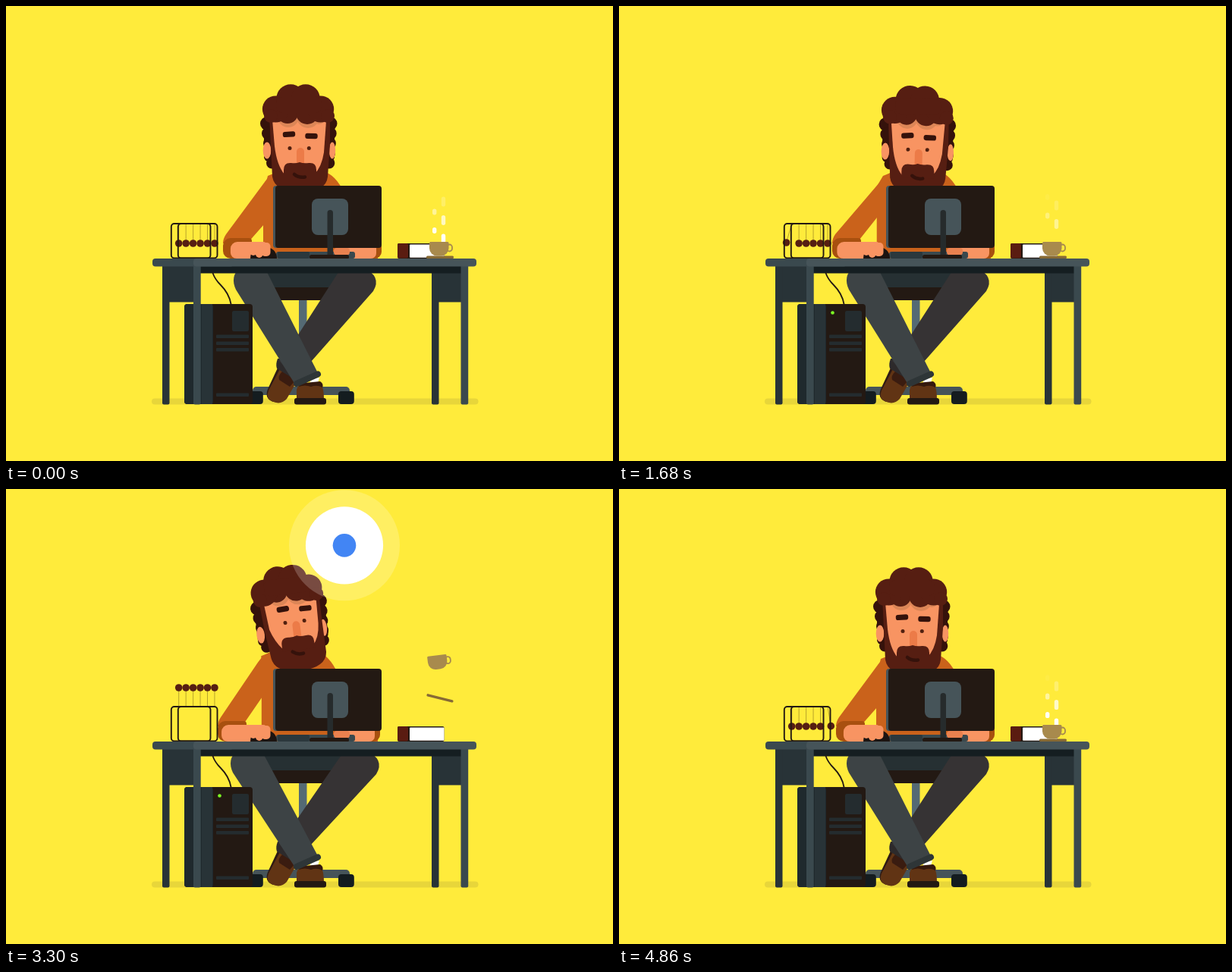
Animation, 800 px wide and 600 px high, one loop 4.89 s. Source, as an HTML page with a canvas:

```html
<!DOCTYPE html>
<html lang="en">
<head>
<meta charset="utf-8">
<title>Desk worker</title>
<style>
html, body { margin: 0; width: 100%; height: 100%; overflow: hidden; background: #ffeb3b; }
canvas { display: block; width: 800px; height: 600px; }
</style>
</head>
<body>
<canvas id="stage" width="800" height="600"></canvas>
<script>
const ctx = document.getElementById('stage').getContext('2d');
const LOOP = 4890, SWING = LOOP / 6, STEP = 30;
const C = {
  bg: '#ffeb3b', ink: '#231913', slate: '#465459', steel: '#3a494e', deep: '#283337',
  skin: '#f89462', blush: '#ec7b48', shade: '#dc8657', hair: '#561e12', hairDark: '#35120b',
  shirt: '#ca621b', cuff: '#a8500f', shoe: '#613414', cup: '#a88a4d', saucer: '#876a35'
};

const REST = { x: 0, y: 0, tilt: 0, faceX: 0, faceY: 0, torsoX: 0, torsoY: 0, elbow: 286, knee: 0 };
const UP = { ...REST, x: 8, y: -13, tilt: -4, faceX: 5.5, faceY: -6, torsoX: 9, torsoY: -7, knee: -5 };
const LEAN = { ...REST, x: 6, y: 2, tilt: 1.2, torsoX: 3, elbow: 281 };
const DROP = { ...REST, y: 6, tilt: -3, faceX: 4.5, faceY: -2, torsoX: -3, elbow: 280, knee: 4 };
const GAZE = { ...DROP, x: -4, y: -4, tilt: -7, faceY: -9.5, torsoX: -9, torsoY: -4, elbow: 279 };
const CUES = [
  [0, REST], [480, REST], [860, UP], [1050, UP], [1650, LEAN], [2300, DROP],
  [2800, GAZE], [3250, GAZE], [3650, DROP], [4250, DROP], [4720, REST], [LOOP, REST]
];

const clamp = v => Math.max(0, Math.min(1, v));
const ease = v => v * v * (3 - 2 * v);
const ramp = (t, a, b) => clamp((t - a) / (b - a));
const bell = (t, a, b) => Math.sin(Math.PI * ramp(t, a, b));

function poseAt(t) {
  const next = CUES.findIndex(([time]) => time > t);
  const [[a, from], [b, to]] = [CUES[next - 1], CUES[next]];
  const u = ease(ramp(t, a, b)), pose = {};
  for (const key in from) pose[key] = from[key] + (to[key] - from[key]) * u;
  return pose;
}

function box(x1, y1, x2, y2, color, r = 0) {
  ctx.fillStyle = color;
  ctx.beginPath();
  ctx.roundRect(x1, y1, x2 - x1, y2 - y1, r);
  ctx.fill();
}
function frame(x, y, w, h, r, color, width) {
  ctx.strokeStyle = color;
  ctx.lineWidth = width;
  ctx.beginPath();
  ctx.roundRect(x, y, w, h, r);
  ctx.stroke();
}
function disc(x, y, r, color, ry = r) {
  ctx.fillStyle = color;
  ctx.beginPath();
  ctx.ellipse(x, y, r, ry, 0, 0, Math.PI * 2);
  ctx.fill();
}
function shape(d, color) {
  ctx.fillStyle = color;
  ctx.fill(new Path2D(d));
}
function line(d, color, width) {
  ctx.strokeStyle = color;
  ctx.lineWidth = width;
  ctx.lineCap = 'round';
  ctx.stroke(new Path2D(d));
}
function placed(x, y, degrees, draw) {
  ctx.save();
  ctx.translate(x, y);
  ctx.rotate(degrees * Math.PI / 180);
  draw();
  ctx.restore();
}
function clipped(x, y, w, h, draw) {
  ctx.save();
  ctx.beginPath();
  ctx.rect(x, y, w, h);
  ctx.clip();
  draw();
  ctx.restore();
}

function drawChair() {
  box(386, 380, 396.5, 505, '#546a74');
  box(325, 502, 453, 513, C.slate, 5);
  for (const x of [318, 438]) box(x, 508, x + 20.8, 525, '#141c1f', 4);
  box(350, 350, 432, 388, C.ink, 6);
  box(338, 345, 450, 371, '#263033');
}

function drawLegs(k) {
  // far shoe and leg
  shape('M360 473L346 503Q339 517 352 522L375 500L380 488Z', '#2f1b14');
  shape('M362 477L346 507Q342 517 350 521Q362 527 370 518L381 499Q372 480 362 477Z', C.shoe);
  shape('M364 482Q358 488 360 493L374 502L381 494L376 482Z', '#3a1c10');
  shape('M358 465L395 466L378 491L357 478Q355 473 358 465Z', '#2d2a2b');
  shape(`M${442 + k} 345H${470 + k}Q${496 + k} 356 ${484 + k} 376L402 469L380 488L360 468L386 432Z`, '#363334');
  // near shoe and leg
  shape('M402 492L413 490L410 500H400Z', '#fff');
  shape('M383 519V506Q385 497 394 497H412Q419 499 419 519Z', C.shoe);
  shape('M386 502Q388 496 394 497L414 495Q419 498 417 503Q410 499 402 502Q394 499 386 502Z', '#35190d');
  box(380, 517, 422, 525.5, C.ink, 3);
  shape(`M${341 - k} 345L410 482L381 499L${303 - k} 374Q${295 - k} 357 ${308 - k} 345Z`, '#3d4345');
  line('M383 498L411 485.5', '#2e3537', 8);
}

function drawTower(lit) {
  box(235, 393, 325, 525, C.ink, 4);
  box(235, 393, 273, 525, '#1f292d', 4);
  box(258, 393, 272, 525, C.deep);
  box(298, 402, 320, 429, '#242c2f', 2);
  for (const y of [433.5, 442.5, 451, 510.5]) box(277, y, 320, y + 4.5, '#242c2f', 1);
  if (lit) disc(281.5, 404.5, 2.3, '#7dfb24');
}

function drawDesk() {
  for (const x of [206, 561]) {
    box(x, 338, x + 41, 390.5, C.deep);
    box(x, 340, x + 9.5, 525.5, C.deep, 2);
  }
  box(256, 340, 602, 352.5, '#151e21');
  for (const x of [247, 599.5]) box(x, 340, x + 9.7, 525.5, C.steel, 2);
  box(193, 333, 300, 343.5, C.steel, 4);
  box(247, 333, 620, 343.5, C.slate, 4);
  line('M272.5 352Q275 360 283 368Q294 379 296.5 393', C.ink, 1.8);
}

function drawTorso({ torsoX, torsoY, elbow, knee }) {
  const edge = 339 + torsoX * .25, inner = 288 + (elbow - 286) * 2;
  const sx = 345 + torsoX, sy = 224 + torsoY;
  const hand = 284 + (elbow - 279) * 1.7, cuff = 495 - knee * .5;
  shape(`M${sx} ${sy}L${sx + 15} ${sy - 6}H${sx + 70}Q${sx + 86} ${sy - 5} ${sx + 98} ${sy + 17}L490 310V333H${edge}V${inner - 40}Z`, C.shirt);
  shape(`M${sx + 15} ${sy - 6}Q${sx + 3} ${sy - 3} ${sx - 4} ${sy + 8}L${elbow + 4} 301Q${elbow} 307 ${elbow} 313H${elbow + 32}L${edge + 1} ${inner}L${sx + 25} ${sy + 20}Z`, C.shirt);
  shape(`M${sx + 31} ${sy + 6}L${sx + 41} ${sy + 20}H${sx + 59}L${sx + 67} ${sy + 4}Z`, '#fff');
  box(elbow, 306, elbow + 22, 333, C.cuff, [10, 0, 0, 10]);
  box(elbow + 15, 306, elbow + 38, 316, C.cuff, 4);
  box(hand, 311, 344, 333, C.skin, [9, 5, 5, 8]);
  box(cuff - 18, 314, cuff, 333, C.cuff, [0, 4, 9, 0]);
  box(440, 317, cuff - 7, 333, C.skin, [0, 0, 7, 0]);
}

function drawFace(fx, fy) {
  shape(`M${350 + fx * .5} 138L${354 + fx * .6} 185Q${357 + fx} ${210 + fy} ${367 + fx} ${222 + fy}H${406 + fx}Q${416 + fx} ${213 + fy} ${419 + fx * .6} ${193 + fy}L423 138Z`, C.skin);
  placed(fx, fy, 0, () => {
    for (const x of [374, 399.3]) disc(x, 187.5, 2.5, '#51200f');
    box(383, 187, 393, 212, C.blush, 5);
    shape('M366 225V216Q366 206 376 207Q382 208 387 206Q392 208 399 207Q409 206 409 216V225Z', C.hair);
  });
  placed(fx * .8, fy * .5, 0, () => line('M380 222Q386 227 394 225.5', C.hairDark, 4.5));
}

function drawHair(fx, fy) {
  const fringe = (color, dx, dy) => {
    for (const [x, r] of [[371, 14], [397, 15], [411, 10]]) disc(x + dx, 140 + dy, r, color);
  };
  clipped(352, 125, 70, 50, () => fringe(C.shade, 1 + fx * .4, 6 + fy * .5));
  fringe(C.hair, fx * .2, 1 + fy * .5);
  for (let i = 0; i < 4; i++) {
    const arch = Math.sin(Math.PI * i / 3);
    disc(355.5 + i * 19.7, 136 - arch * 16, 17.6 + arch * 1.5, C.hair);
  }
  for (const x of [349, 424]) disc(x, 145, 9, C.hair);
  box(356, 120, 416, 141, C.hair, 8);
}

function drawHead({ x, y, tilt, faceX: fx, faceY: fy }) {
  placed(390 + x, 235 + y, tilt, () => {
    ctx.translate(-390, -235);
    box(340, 145, 433, 205, C.hairDark, 6);
    for (let i = 0; i < 5; i++) {
      const cy = 155 + i * 13, r = 9 - i * .4;
      disc(344 + i * 1.6, cy, r, C.hairDark);
      disc(427.5 - i * .4, cy, r, C.hairDark);
    }
    disc(344 + fx * .1, 190.5, 5.3, C.skin, 11);
    disc(430 - fx * .4, 190.5, 4.2, C.skin, 11);
    const bx = fx * .8, by = fy * .25;
    shape(`M347 142L${349 + bx * .3} 185L${351 + bx} ${225 + by}Q${354 + bx} ${245 + by} ${388 + bx} ${246 + by}Q${422 + bx} ${245 + by} ${424 + bx} ${225 + by}L427 183V142Z`, C.hair);
    drawFace(fx, fy);
    drawHair(fx, fy);
    for (const [bx, by, turn] of [[373, 169.2, -3], [402.5, 171.5, 1]])
      placed(bx + fx, by + fy, turn, () => box(-8.2, -3.6, 8.2, 3.6, C.hairDark, 3));
  });
}

function drawBubble(t) {
  if (t < 2130 || t > 3820) return;
  const y = 68 + 100 * Math.exp((2310 - t) * .004) + 66 * Math.exp((t - 3660) * .0075);
  const r = 50 - (y - 81) * .161;
  disc(446, y, r * 1.43, 'rgba(255,255,255,.2)');
  disc(446, y, r, '#fff');
  disc(446, y, r * .3, '#4285f4');
}

function drawScreen() {
  box(356, 324, 460, 333, C.steel, 3);
  box(358, 324, 400, 333, '#2b383d', 2);
  box(432, 319, 453, 328.5, '#e9814f', 4);
  shape('M322 333Q322 318 340 317Q357 319 357 333Z', '#1c1411');
  box(336, 312, 348.5, 330, C.skin, 5);
  box(329, 315, 338.5, 332, C.skin, 5);
  box(321, 314, 331, 329, C.skin, 5);
  box(352, 237, 380, 319, C.slate, 4);
  box(355, 237, 495, 319, C.ink, 4);
  box(403, 254, 451, 302, C.slate, 8);
  box(423.5, 269, 431, 331, '#262b2c', 4);
  box(400, 328, 452, 333.5, C.ink, 2.5);
}

function drawCradle(t) {
  const swing = 19 * Math.sin(t / SWING * 2 * Math.PI);
  const rise = ease(ramp(t, 2250, 2700));
  const sway = -8 * bell(t, 2500, 3270);
  for (let i = 0; i < 6; i++) {
    const last = i === 5, x = 227.7 + i * 9.45;
    const drop = last ? ramp(t, 3640, 3860) : ramp(t, 3540, 3755);
    const lift = rise * (1 - drop * drop);
    const active = i === 0 ? Math.max(0, swing) : last ? Math.min(0, swing) : 0;
    const arc = -active * (1 - lift);
    const bx = x + arc + sway + (last ? 10 * bell(t, 3420, 3900) : 0);
    const by = 287 + Math.sqrt(676 - arc * arc) - 51 * lift;
    line(`M${x} 287L${bx} ${by}`, 'rgba(70,50,20,.55)', .7);
    disc(bx, by, 4.8, C.hair);
  }
  for (const x of [217.8, 226.8]) frame(x, 287, 51.7, 45.5, 4, C.ink, 1.9);
}

function drawSteam(t) {
  const early = t < 2200;
  if (!early && t < 3950) return;
  const beats = (early ? t : t - LOOP) / 350;
  const first = early ? -9 : (3950 - LOOP) / 350, final = early ? 4.4 : 9;
  const fade = early ? 1 - .5 * ramp(t, 1200, 1750) : 1;
  clipped(550, 230, 40, 81, () => {
    for (const [x, offset, size] of [[576.5, 0, 13], [564.7, .55, 8]]) {
      for (let k = Math.floor(beats) - 3; k <= beats + 2; k++) {
        const birth = k + offset, travel = (beats - birth) * 24.5;
        if (birth < first || birth > final || travel < -14) continue;
        const alpha = clamp(1.15 - travel * .019) * fade;
        const y = 307 - travel;
        box(x - 2.7, y - size / 2, x + 2.7, y + size / 2, `rgba(255,255,255,${alpha})`, 2.7);
      }
    }
  });
}

function drawCup(t) {
  box(516, 313, 577.5, 333, C.ink, 2);
  box(516, 313, 530, 332.5, '#5a1c11', 2);
  box(532, 314.5, 577.5, 331.8, '#fff', 1);
  drawSteam(t);
  const fall = ramp(t, 3680, 3900);
  const lift = (1 - Math.exp(-Math.max(0, t - 2185) / 180)) * (1 - fall * fall);
  placed(572, 331.2 - 55.5 * lift, 14 * lift, () => box(-18, -1.7, 18, 1.8, C.saucer, 1.5));
  placed(571 - 2 * lift, 320 - 92 * lift, -7 * lift, () => {
    box(-13, -9, 12.5, 9.5, C.cup, [1.5, 1.5, 10, 10]);
    frame(10, -5.5, 7, 9, 4, C.cup, 1.8);
  });
}

function draw(t) {
  const pose = poseAt(t), beat = t % SWING;
  box(0, 0, 800, 600, C.bg);
  box(192, 517.5, 622.5, 525.5, '#e8d63a', 4);
  drawChair();
  drawLegs(pose.knee);
  drawTower(beat > 30 && beat < 450);
  drawTorso(pose);
  drawHead(pose);
  drawBubble(t);
  drawScreen();
  drawCradle(t);
  drawCup(t);
  drawDesk();
}

const start = performance.now();
function tick() {
  const t = Math.max(0, performance.now() - start) % LOOP;
  draw(Math.floor(t / STEP) * STEP);
  requestAnimationFrame(tick);
}
tick();
</script>
</body>
</html>
```
